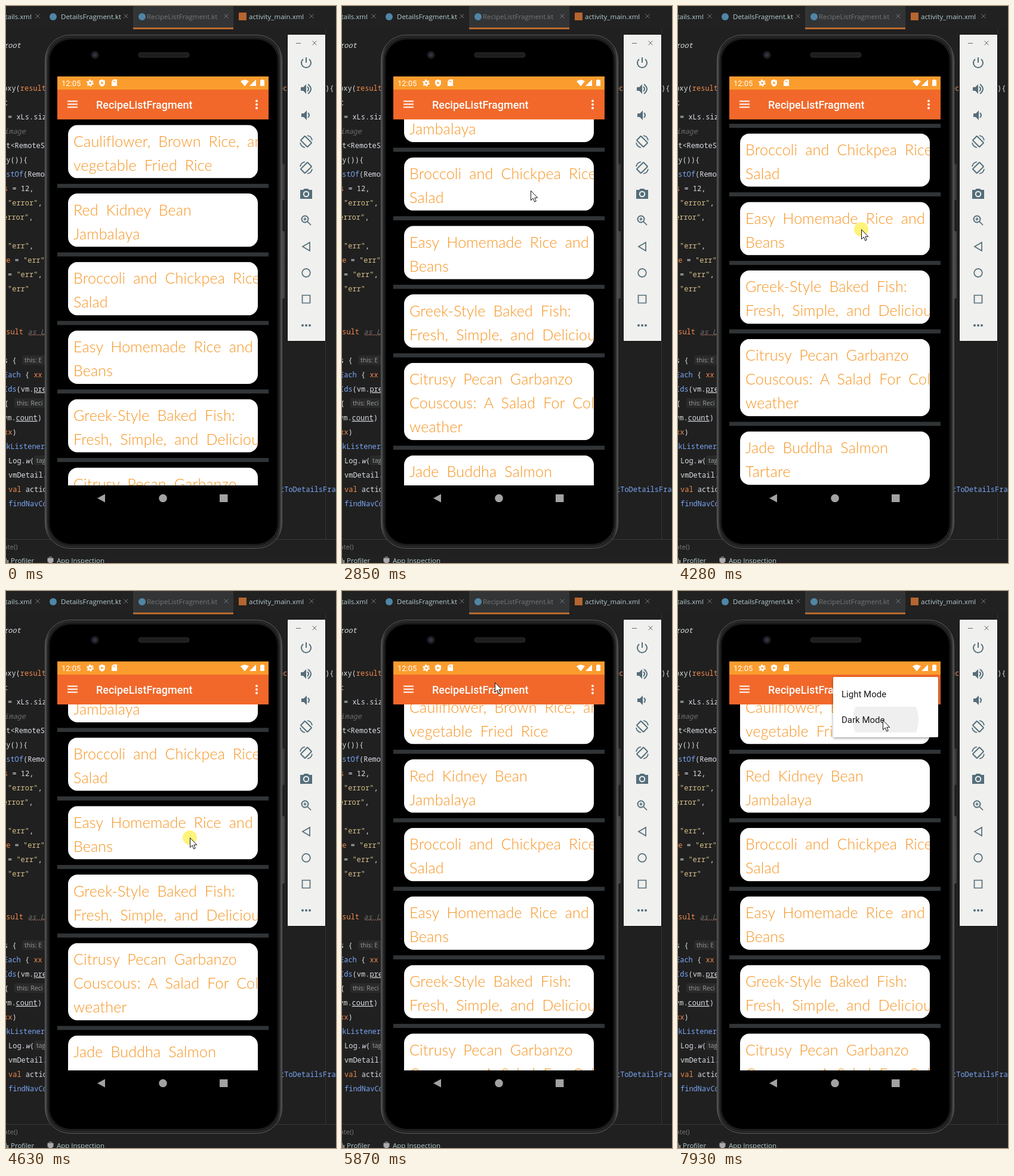
An HTML page for the animation above (8 s loop, 553 by 933 pixels).

```html
<!DOCTYPE html>
<html lang="en">
<head>
<meta charset="utf-8">
<title>Recipe list</title>
<style>
html, body { margin: 0; width: 100%; height: 100%; overflow: hidden; background: #202020; }
svg { display: block; }
text { white-space: pre; }
.code { font: 12px "Noto Sans Mono", monospace; fill: #d9dce3; }
.code .o { fill: #f08a4b; }
.code .b { fill: #7aa6f5; }
.code .s { fill: #d6c08a; }
.code .g { fill: #6c6c6c; font-style: italic; }
.code .i { font-style: italic; }
.code .u { text-decoration: underline; }
.ui { font: 11.5px "Open Sans", sans-serif; fill: #b5cdd0; }
.hint { font: 10.5px "Open Sans", sans-serif; fill: #9a9da2; }
.app { font: 500 18px Roboto, sans-serif; fill: #fff; }
.clock { font: 13px Roboto, sans-serif; fill: #fff; }
.menu { font: 15px Roboto, sans-serif; fill: #1c1c1c; }
.recipe { font: 300 25px Lato, sans-serif; letter-spacing: .2px; word-spacing: 6px; fill: #f7931e; }
.line { fill: none; stroke: #546e7a; stroke-width: 2; }
.thin { stroke-width: 1.7; }
.solid { fill: #546e7a; }
</style>
</head>
<body>
<script>
const LOOP = 8000;

const rect = (x, y, w, h, fill, rx = 0, more = '') =>
  `<rect x="${x}" y="${y}" width="${w}" height="${h}" fill="${fill}" rx="${rx}" ${more}/>`;
const circle = (x, y, r, fill, more = '') => `<circle cx="${x}" cy="${y}" r="${r}" fill="${fill}" ${more}/>`;
const text = (x, y, cls, s, more = '') => `<text x="${x}" y="${y}" class="${cls}" ${more}>${s}</text>`;
const path = (d, more) => `<path d="${d}" ${more}/>`;
const at = (x, y, s) => `<g transform="translate(${x} ${y})">${s}</g>`;
const cross = (x, y, r, color) =>
  path(`M${x - r} ${y - r}l${2 * r} ${2 * r}m0 ${-2 * r}l${-2 * r} ${2 * r}`, `stroke="${color}" fill="none"`);

// Code rows: [row, x, text]; ~c:text~ colours a span.
const rows = [
  [0, -4, '~i:root~'],
  [3, -5, 'oxy(~o:result~'],
  [4, -4, 't'],
  [5, 3, '= xLs.siz'],
  [6, -3, '~g:image~'],
  [7, -7, 'st&lt;RemoteS'],
  [8, -7, 'ty()){'],
  [9, -7, '~b:istOf~(Remo'],
  [10, -4, '~o:s~ = 12,'],
  [11, 3, '~s:"error"~,'],
  [12, -5, '~s:error"~,'],
  [14, 3, '~s:"err"~,'],
  [15, -7, '~o:pe~ = ~s:"err"~'],
  [16, 3, '= ~s:"err"~,'],
  [17, 3, '~s:"err"~'],
  [20, -7, '~o:esult~ ~g:as L~'],
  [22, -4, 's {'],
  [23, -4, '~b:Each~ { ~o:xx~'],
  [24, -4, '~b:Ids~(vm.~u:pre~'],
  [25, -3, '{'],
  [26, -5, 'vm.~u:count~)'],
  [27, -4, '~o:xx~)'],
  [28, -7, '~b:ckListener~'],
  [29, 4, 'Log.~i:w~('],
  [30, 4, 'vmDetail.'],
  [31, 4, '~o:val~ actio'],
  [32, 4, '~b:findNavCo~'],
  [3, 457, '~o:ec~'],
  [3, 535, '){'],
  [31, 459, '~b:tToDetailsFragment~']
];
const spans = s => s.replace(/~(\w):([^~]*)~/g, '<tspan class="$1">$2</tspan>');
const hint = (x, y, w, s) => rect(x - 4, y - 12, w, 16, '#2a2a2a', 3) + text(x, y, 'hint', s);

const editor =
  rect(0, 0, 553, 933, '#202020') +
  rect(0, 0, 553, 38, '#212121') + rect(213, 0, 168, 38, '#333435') + rect(213, 36, 168, 3, '#b96a2c') +
  text(-8, 22, 'ui', 'etails.xml') + text(92, 22, 'ui', 'DetailsFragment.kt') +
  text(236, 22, 'ui', 'RecipeListFragment.kt', 'style="fill:#777"') + text(407, 22, 'ui', 'activity_main.xml') +
  [53, 201, 369, 512].map(x => cross(x, 17, 3.5, '#74777a')).join('') +
  circle(79, 18, 6, '#4f86a6') + circle(228, 18, 6, '#4f86a6') + rect(390, 11, 13, 13, '#b5652f', 1) +
  rect(535, 39, 1, 854, '#343434') +
  rows.map(([row, x, s]) => text(x, 70 + row * 24, 'code', spans(s))).join('') +
  path('M38 552l2-2' + 'l2 2l2-2'.repeat(7), 'fill="none" stroke="#8d5a50"') +
  hint(31, 597, 50, 'this: E') + hint(18, 669, 60, 'this: Reci') + hint(51, 765, 30, 'tag') +
  rect(0, 893, 553, 1, '#3a3a3a') + text(-4, 910, 'ui', 'ate()', 'style="fill:#777"') +
  rect(0, 918, 553, 15, '#212121') +
  text(8, 933, 'ui', 'Profiler') + text(85, 933, 'ui', 'App Inspection') +
  path('M0 925v8M3 928v5', 'stroke="#aaa" stroke-width="2"') +
  path('M70 925h9v6h-2v3h-5v-3h-2zM72 923h5', 'fill="#aaa" stroke="#aaa"');

const phone =
  rect(461, 264, 6, 61, '#3a3a3a', 2) + rect(461, 377, 6, 113, '#444', 2) +
  rect(65.5, 48.5, 397, 860, 'url(#metal)', 42, 'stroke="#5a5b5d"') +
  rect(69, 52, 390, 853, '#1b1b1c', 39, 'stroke="#333"') +
  rect(73, 56, 382, 845, '#000', 35) +
  circle(149, 82, 6.5, '#1d1f24') + circle(149, 82, 3, '#30343f') +
  rect(222, 78, 85, 8, '#1e1e1e', 4, 'stroke="#2b2b2b"');

const gear = circle(0, 0, 3, 'none', 'stroke="#fff" stroke-width="2.6"') +
  circle(0, 0, 5, 'none', 'stroke="#fff" stroke-width="2" stroke-dasharray="2.6 2.636"');
const appBar =
  rect(86, 118, 354, 22.5, '#fb9c2e') + rect(86, 140, 354, 50, '#f1682a') +
  text(93, 134, 'clock', '12:05') + at(141, 129, gear) +
  path('M161 123l5 2v4q0 4-5 6q-5-2-5-6v-4z', 'fill="#fff"') + path('M159.5 126.5l4 2.5-4 2.5z', 'fill="#fb9c2e"') +
  path('M180 123h6v11h-9v-8z', 'fill="#fff"') + path('M180.5 125v2.5m2-2.5v2.5', 'stroke="#fb9c2e"') +
  path('M393 126q7-5 14 0l-7 8.5zM419 123v11h-11zM426 124h2v-1h3v1h2v10h-7z', 'fill="#fff"') +
  path('M103 159.5h17m-17 5h17m-17 5h17', 'stroke="#fff" stroke-width="2"') +
  text(151, 172, 'app', 'RecipeListFragment') +
  [159, 165, 171].map(y => circle(420, y, 2, '#fff')).join('');

const recipes = [
  ['Cauliflower, Brown Rice, and', 'vegetable Fried Rice'],
  ['Red Kidney Bean', 'Jambalaya'],
  ['Broccoli and Chickpea Rice', 'Salad'],
  ['Easy Homemade Rice and', 'Beans'],
  ['Greek-Style Baked Fish:', 'Fresh, Simple, and Delicious'],
  ['Citrusy Pecan Garbanzo', 'Couscous: A Salad For Cold', 'weather'],
  ['Jade Buddha Salmon', 'Tartare'],
  ['Chili Tricolour Bean', 'Salad']
];
let cardTop = 199.2;
const cards = recipes.map(lines => {
  const h = 9.4 + lines.length * 40, y = cardTop;
  cardTop += h + 25.4;
  return `<svg x="104" y="${y}" width="318" height="${h}">` + rect(0, 0, 318, h, '#fff', 16) +
    lines.map((s, i) => text(9, 36.5 + i * 40, 'recipe', s)).join('') + '</svg>' +
    rect(86, y + h + 9.3, 354, 6.8, '#313437');
}).join('');

const navBar = rect(86, 803, 354, 44, '#000') +
  path('M153 824.5l13-7v14z', 'fill="#a2a2a2"') + circle(263, 824.5, 6.8, '#a2a2a2') + rect(358, 818, 13.5, 13, '#a2a2a2');

const speaker = path('M-9-3h4l5-5v16l-5-5h-4z', 'class="solid"');
const rotate = flip => `<g transform="scale(${flip} 1)">` +
  '<rect x="-5" y="-8" width="10" height="16" rx="1" class="line" transform="rotate(-45)"/>' +
  path('M-10 2a10 10 0 0 0 8 8M10-2a10 10 0 0 0-8-8', 'class="line thin"') + '</g>';
const tools = [
  path('M-5-6a8 8 0 1 0 10 0M0-9v9', 'class="line"'),
  speaker + path('M2-4q4 4 0 8M3-8q10 8 0 16', 'class="line"'),
  at(1, 0, speaker + path('M2-4q4 4 0 8', 'class="line"')),
  rotate(1),
  rotate(-1),
  path('M-10-7h5l2-2h6l2 2h5v15h-20z', 'class="solid"') + circle(0, 0, 4.2, '#546e7a', 'stroke="#f0f0ee" stroke-width="2"'),
  circle(-2, -2, 5.5, 'none', 'class="line"') + path('M2 2l6 6M-4.5-2h5M-2-4.5v5', 'class="line thin"'),
  path('M-6 0l12-7v14z', 'class="line thin"'),
  circle(0, 0, 6.8, 'none', 'class="line thin"'),
  path('M-6.5-6.5h13v13h-13z', 'class="line thin"'),
  [-6, 0, 6].map(x => circle(x, 0, 2, '#546e7a')).join('')
];
const sidePanel = rect(471.5, 47.5, 64, 514, '#f0f0ee', 0, 'stroke="#111"') +
  path('M486 62.5h8', 'stroke="#666"') + cross(517, 62, 3.5, '#666') +
  tools.map((s, i) => at(503, 95 + i * 44, s)).join('');

const popup = `<g id="popup">${rect(260, 144, 176, 101, '#fff', 2, 'filter="url(#shadow)"')}
  <g clip-path="url(#item)">${circle(348, 216, 55, '#efefef', 'id="ripple"')}</g>
  ${text(274, 178, 'menu', 'Light Mode')}${text(274, 221, 'menu', 'Dark Mode')}</g>`;

const pointer = `<g id="pointer">${circle(0, 0, 12, '#fff05a', 'id="press" fill-opacity=".8"')}
  ${path('M.5.5v16l3.7-3.5 2.5 6 2.6-1.1-2.5-5.7h5z', 'fill="#fff" stroke="#111"')}</g>`;

document.body.innerHTML = `<svg width="553" height="933" viewBox="0 0 553 933">
  <defs>
    <linearGradient id="metal"><stop stop-color="#4b4c4e"/><stop offset=".02" stop-color="#222"/>
      <stop offset=".98" stop-color="#222"/><stop offset="1" stop-color="#4b4c4e"/></linearGradient>
    <clipPath id="view"><rect x="86" y="190" width="354" height="613"/></clipPath>
    <clipPath id="item"><rect x="260" y="194" width="176" height="43"/></clipPath>
    <filter id="shadow"><feDropShadow dx="0" dy="1.5" stdDeviation="2" flood-opacity=".4"/></filter>
  </defs>
  ${editor}${phone}<g clip-path="url(#view)"><g id="list">${cards}</g></g>
  ${appBar}${navBar}${sidePanel}${popup}${pointer}</svg>`;

const pointerPath = [
  [170, 499, 824], [450, 468, 618], [700, 468, 616], [1430, 359, 168], [1820, 359, 168],
  [2240, 315, 429], [2380, 315, 440], [2750, 316, 300], [3330, 317, 349], [3530, 317, 349],
  [3700, 312, 330], [4280, 307, 374], [5450, 311, 504], [5540, 308, 520], [5870, 256, 153],
  [6140, 256, 153], [6740, 422, 158], [6950, 422, 158], [7650, 305, 216], [7790, 305, 216], [7930, 343, 216]
];
const scrollPath = [
  [2400, 0], [2750, 140], [2950, 210], [3130, 246], [3330, 260], [3720, 260],
  [4280, 215.5], [5450, 108.5], [5540, 72], [5640, 44], [5770, 32]
];
const presses = [[2330, 2750], [3700, 5540], [6740, 6880], [7650, 7790]];

function sample(track, t) {
  const next = track.findIndex(k => k[0] > t);
  if (next < 0) return track[track.length - 1].slice(1);
  if (next === 0) return track[0].slice(1);
  const a = track[next - 1], b = track[next], p = (t - a[0]) / (b[0] - a[0]);
  return a.slice(1).map((v, i) => v + (b[i + 1] - v) * p);
}

const show = (node, on) => node.setAttribute('visibility', on ? 'inherit' : 'hidden');
const move = (node, x, y) => node.setAttribute('transform', `translate(${x} ${y})`);
const ramp = (t, from, to) => Math.min(1, Math.max(0, (t - from) / (to - from)));
const parts = Object.fromEntries(
  ['list', 'popup', 'ripple', 'pointer', 'press'].map(id => [id, document.getElementById(id)]));

function draw(t) {
  move(parts.list, 0, -sample(scrollPath, t)[0]);
  const [x, y] = sample(pointerPath, t);
  move(parts.pointer, Math.round(x), Math.round(y));
  show(parts.pointer, t >= 170);
  show(parts.press, t >= 170 && presses.some(([a, b]) => t >= a && t < b));
  const open = ramp(t, 6930, 7130), scale = .6 + .4 * open;
  show(parts.popup, open > 0);
  parts.popup.setAttribute('opacity', open);
  parts.popup.setAttribute('transform', `translate(436 144) scale(${scale}) translate(-436 -144)`);
  parts.ripple.setAttribute('r', 55 * ramp(t, 7630, 7720));
}

const startTime = performance.now();
function tick() {
  draw((performance.now() - startTime) % LOOP);
  requestAnimationFrame(tick);
}
tick();
</script>
</body>
</html>
```
